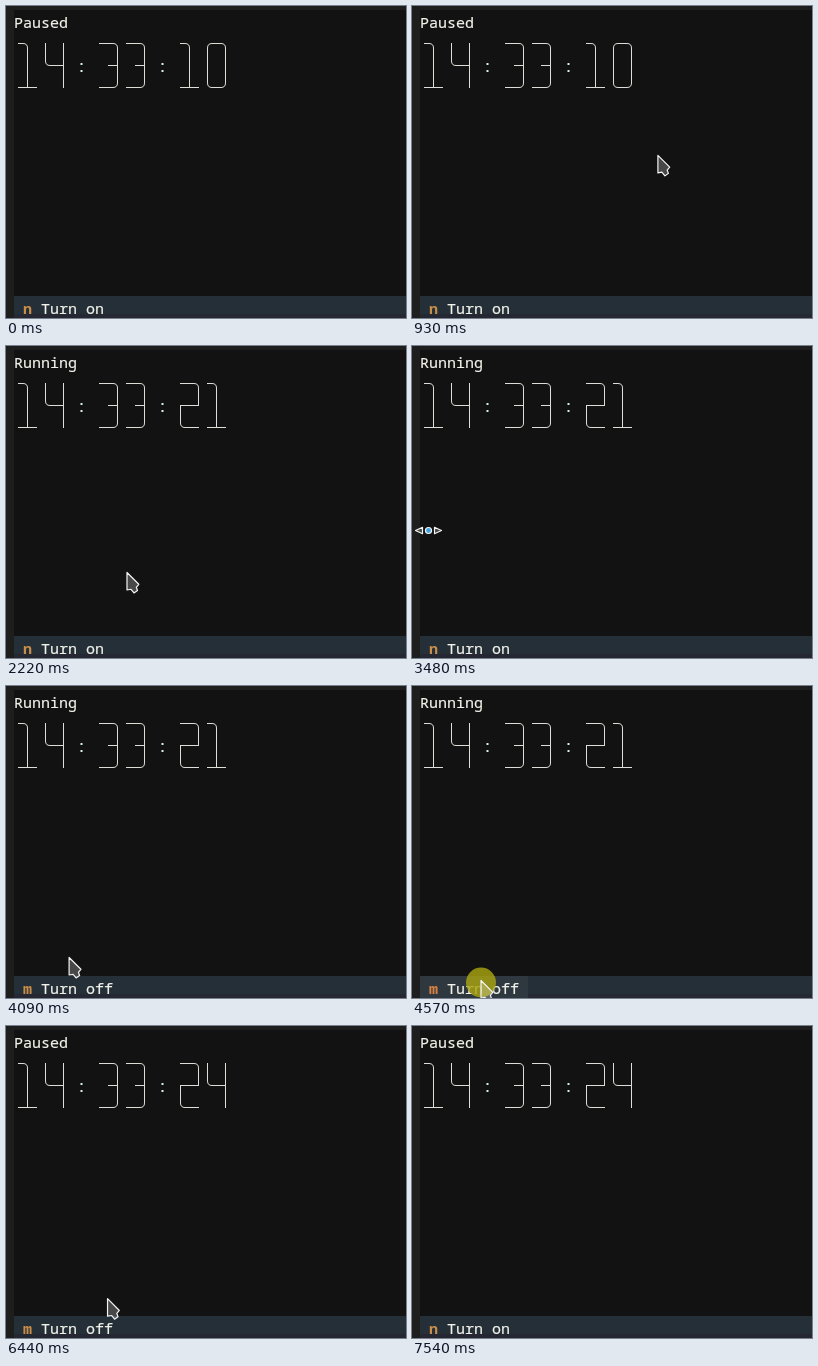
Write an HTML page that moves like this. It is 400 px wide and 312 px high and loops after 8970 ms.

```html
<!DOCTYPE html>
<html lang="en">
<head>
<meta charset="utf-8">
<title>Terminal clock</title>
<style>
  html, body { margin: 0; width: 100%; height: 100%; overflow: hidden; background: #1e1e1e; }
  svg { display: block; width: 400px; height: 312px; }
  text { font: 500 15px "Noto Sans Mono", "DejaVu Sans Mono", monospace; fill: #f2f2ea; white-space: pre; }
  #status, #label { stroke: #f2f2ea; stroke-width: .2; }
  #key { font-weight: 700; fill: #c98d48; }
  .hover #key { fill: #d98243; }
  #glow { fill: #2f383f; visibility: hidden; }
  .hover #glow { visibility: visible; }
  #digits path { fill: none; stroke: #deded8; stroke-linecap: square; }
  #digits rect { fill: #d8f0e6; }
  .pointer { fill: #fff; fill-opacity: .23; stroke: #f4f4f4; stroke-width: 1.2; stroke-linejoin: round; }
</style>
</head>
<body>
<svg viewBox="0 0 400 312">
  <rect width="400" height="312" fill="#1e1e1e"/>
  <rect x="8" y="4" width="392" height="286" fill="#121212"/>
  <text id="status" x="8" y="22"></text>
  <g id="digits"></g>
  <g id="footer">
    <rect x="8" y="290" width="392" height="22" fill="#242f38"/>
    <rect x="8" y="308" width="392" height="4" fill="#252733"/>
    <rect id="glow" x="8" y="290" height="22"/>
    <text id="key" x="17" y="308"></text>
    <text id="label" x="35" y="308"></text>
  </g>
  <circle id="press" r="15" fill="#a8a410" fill-opacity=".82"/>
  <path id="arrow" class="pointer" d="M.5 .5V18L4.500 17.300L7.500 21L11 18.500L9.800 15.300L12.300 12.300Z"/>
  <g id="resize" class="pointer">
    <path d="M3.500 184.500L10.500 181.300V187.700ZM29.500 184.500L22.500 181.300V187.700Z"/>
    <circle cx="16.500" cy="184.500" r="3" fill="#3da3e3" fill-opacity="1"/>
  </g>
</svg>
<script>
const LOOP = 8970, STEP = 40, COL = 9, ROW = 22;
const FIRST_CLICK = 1730, SECOND_CLICK = 4570, CLICK_TIME = 120, RESIZE = 3480;
const $ = id => document.getElementById(id);

// Digit strokes as corners of a 3 x 3 grid, lettered a to i row by row
const STROKES = { 0: 'dacigd', 1: 'abh gi', 2: 'acf fd dgi', 3: 'acig ef', 4: 'adf ci' };

// Pointer curves: it rests at the end until the next one, or vanishes when "leaves" is set
const MOVES = [
  { start: 330, end: 570, from: [319, 17], via: [305, 70], to: [254, 136] },
  { start: 730, end: 1570, from: [254, 124], via: [260, 166], to: [64, 294] },
  { start: 2140, end: 2740, from: [104, 244], via: [182, 170], to: [18, 192] },
  { start: RESIZE, end: 3760, from: [18, 176], via: [35, 165], to: [62, 265] },
  { start: 4050, end: 4570, from: [62, 268], via: [66, 288], to: [68.5, 294] },
  { start: 4980, end: 5300, from: [62, 288], via: [34, 274], to: [0, 265], leaves: true },
  { start: 6120, end: 6560, from: [2, 255], via: [85, 305], to: [127, 250] },
  { start: 7260, end: 7540, from: [148, 239], via: [258, 160], to: [400, 63], leaves: true }
];

function pointerAt(t) {
  const m = MOVES.filter(move => move.start <= t).pop();
  if (!m || (m.leaves && t >= m.end)) return null;
  const time = Math.floor((t - m.start) / STEP) * STEP;
  const k = Math.min(1, time / (m.end - m.start));
  return [0, 1].map(i =>
    (1 - k) ** 2 * m.from[i] + 2 * k * (1 - k) * m.via[i] + k * k * m.to[i]);
}

function corner(letter) {
  const n = letter.charCodeAt(0) - 97;
  return [(n % 3 + 0.5) * COL, Math.floor(n / 3) * ROW];
}

// Point at half a cell from p towards q
function near(p, q) {
  const k = COL / 2 / Math.hypot(q[0] - p[0], q[1] - p[1]);
  return p.map((v, i) => v + (q[i] - v) * k);
}

function roundedPath(letters) {
  const pts = [...letters].map(corner);
  return pts.map((p, i) => {
    if (i === 0) return `M${p}`;
    if (i === pts.length - 1) return `L${p}`;
    return `L${near(p, pts[i - 1])}Q${p} ${near(p, pts[i + 1])}`;
  }).join('');
}

const dot = y => `<rect x="12.500" y="${y}" width="2" height="2"/>`;

function glyph(char, i) {
  const shape = char === ':'
    ? dot(19.5) + dot(26.5)
    : `<path d="${STROKES[char].split(' ').map(roundedPath).join('')}"/>`;
  return `<g transform="translate(${8 + i * 3 * COL} 37.500)">${shape}</g>`;
}

let shown = '';
function setClock(value) {
  if (value === shown) return;
  shown = value;
  $('digits').innerHTML = [...value].map(glyph).join('');
}

const show = (node, on) => node.setAttribute('visibility', on ? 'visible' : 'hidden');
const pressed = (t, click) => t >= click && t < click + CLICK_TIME;

function draw(t) {
  const started = t >= FIRST_CLICK + CLICK_TIME;
  const stopped = t >= SECOND_CLICK + CLICK_TIME;
  const action = t >= 3680 && t < 6480 ? 'm Turn off' : 'n Turn on';
  const width = (action.length + 2) * COL;

  $('status').textContent = started && !stopped ? 'Running' : 'Paused';
  setClock('14:33:' + (stopped ? 24 : started ? 21 : 10));
  $('key').textContent = action[0];
  $('label').textContent = action.slice(2);
  $('glow').setAttribute('width', width);

  const pos = pointerAt(t);
  const resizing = t >= RESIZE && t < RESIZE + STEP;
  show($('resize'), resizing);
  show($('arrow'), pos && !resizing);
  show($('press'), pressed(t, FIRST_CLICK) || pressed(t, SECOND_CLICK));
  if (pos) {
    const place = `translate(${pos})`;
    $('arrow').setAttribute('transform', place);
    $('press').setAttribute('transform', place + ' translate(.5 2.5)');
  }
  const hover = pos && pos[1] >= 290 && pos[0] >= 8 && pos[0] < 8 + width;
  $('footer').setAttribute('class', hover ? 'hover' : '');
}

const begin = performance.now();
function tick() {
  draw((performance.now() - begin) % LOOP);
  requestAnimationFrame(tick);
}
tick();
</script>
</body>
</html>
```
